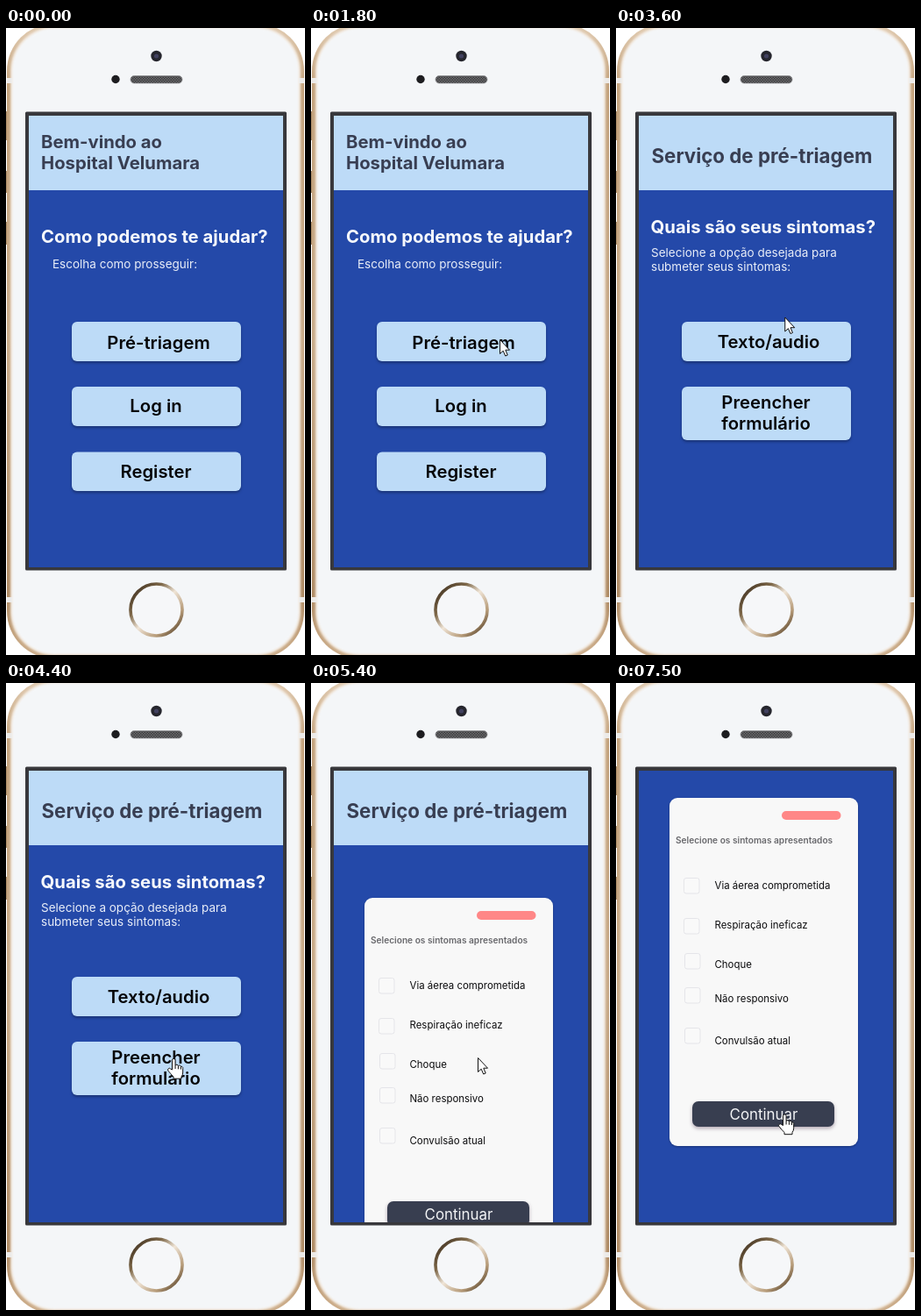
An HTML page for the animation above (8 s loop, 341 px wide and 715 px high).

```html
<!DOCTYPE html>
<html lang="pt">
<head>
<meta charset="utf-8">
<title>Pré-triagem</title>
<style>
html, body { margin: 0; height: 100%; overflow: hidden; background: #fff; }
svg { display: block; width: 100vw; height: 100vh; }
text { font-family: Inter, sans-serif; font-optical-sizing: none; }
.title { font-weight: 700; fill: #383e52; }
.ask { font-weight: 700; font-size: 20.3px; fill: #f6f8fc; }
.note { font-size: 13.5px; fill: #e9eef8; }
.label { font-weight: 600; font-size: 20.3px; text-anchor: middle; fill: #050507; }
.item { font-size: 11.45px; fill: #0c0c0e; }
.btn { fill: #bddbf7; filter: drop-shadow(0 2px 1.5px rgba(0,0,0,.3)); }
.check { fill: #f9f9f9; stroke: #e5e5e9; }
.soft { filter: blur(1px); }
</style>
</head>
<body>
<svg viewBox="0 0 341 715">
  <defs>
    <linearGradient id="gold" x2="0" y2="1">
      <stop offset="0" stop-color="#e2cdb4"/>
      <stop offset=".1" stop-color="#c3a27c"/>
      <stop offset=".5" stop-color="#c8aa88"/>
      <stop offset=".9" stop-color="#ae8a63"/>
      <stop offset="1" stop-color="#cfb18f"/>
    </linearGradient>
    <linearGradient id="ring" x2="1" y2="1">
      <stop offset=".1" stop-color="#4a3a27"/>
      <stop offset=".3" stop-color="#7d6748"/>
      <stop offset=".5" stop-color="#efe4d6"/>
      <stop offset=".75" stop-color="#b79c7a"/>
      <stop offset=".9" stop-color="#6b553a"/>
    </linearGradient>
    <pattern id="mesh" width="3" height="3" patternUnits="userSpaceOnUse">
      <path fill="#6c6c6e" d="M0 0h3v3h-3z"/>
      <path fill="#3b3b3d" d="M0 0h1.5v1.5h-1.5zM1.5 1.5h1.5v1.5h-1.5z"/>
    </pattern>
    <clipPath id="view"><rect x="26" y="100" width="290" height="515"/></clipPath>
  </defs>

  <!-- phone -->
  <path fill="#a98a66" d="M0 95h2v33H0zM0 163h2v25H0zM0 221h2v26H0z"/>
  <rect x="1" y="-5" width="339" height="724" rx="54" fill="url(#gold)"/>
  <rect class="soft" x="5" y="-1.500" width="331" height="717" rx="50" fill="#f0e4d6"/>
  <path fill="#eceae7" d="M1 57h6v6H1zM334 57h6v6h-6zM1 649h6v6H1zM334 649h6v6h-6z"/>
  <rect class="soft" x="7" y="0" width="327" height="714" rx="49" fill="#f4f6f8"/>
  <circle cx="171.5" cy="32" r="6.2" fill="#25252d"/>
  <circle cx="171.5" cy="32" r="2.6" fill="#41415f"/>
  <circle cx="125" cy="58.5" r="4.7" fill="#1d1d20"/>
  <rect x="142" y="54.5" width="59" height="8.5" rx="4.2" fill="url(#mesh)" stroke="#8a8a8d" stroke-width=".7"/>
  <circle cx="171.5" cy="663.5" r="29.5" fill="#f6f7f9" stroke="url(#ring)" stroke-width="3.6"/>
  <rect x="22" y="95.500" width="298" height="523" rx="1.5" fill="#38383c"/>

  <g clip-path="url(#view)">
    <rect x="26" y="100" width="290" height="515" fill="#2449a9"/>

    <g id="home">
      <path fill="#bddbf7" d="M26 100h290v85H26z"/>
      <g class="title" font-size="20.3">
        <text x="40" y="136.5">Bem-vindo ao</text>
        <text x="40" y="160.5">Hospital Velumara</text>
      </g>
      <text class="ask" x="40" y="244.5">Como podemos te ajudar?</text>
      <text class="note" x="53" y="274">Escolha como prosseguir:</text>
      <rect class="btn" x="75" y="335" width="193" height="45" rx="6"/>
      <rect class="btn" x="75" y="409" width="193" height="45" rx="6"/>
      <rect class="btn" x="75" y="483.5" width="193" height="44.5" rx="6"/>
      <text class="label" x="174" y="366">Pré-triagem</text>
      <text class="label" x="171" y="438">Log in</text>
      <text class="label" x="171" y="512.5">Register</text>
    </g>

    <g id="triage">
      <path fill="#bddbf7" d="M26 100h290v85H26z"/>
      <text class="title" font-size="22.3" x="40.5" y="153.5">Serviço de pré-triagem</text>

      <g id="choice">
        <text class="ask" x="39.5" y="233.5">Quais são seus sintomas?</text>
        <text class="note" x="40" y="261">Selecione a opção desejada para</text>
        <text class="note" x="40" y="277">submeter seus sintomas:</text>
        <rect class="btn" x="75" y="335" width="193" height="45" rx="6"/>
        <rect class="btn" x="75" y="409" width="193" height="61" rx="6"/>
        <text class="label" x="174" y="364.5">Texto/audio</text>
        <text class="label" x="171" y="434">Preencher</text>
        <text class="label" x="171" y="458">formulário</text>
      </g>

      <g id="form">
        <rect x="61" y="245" width="215" height="397" rx="9" fill="#f8f8f8" style="filter:drop-shadow(0 1px 1px rgba(0,0,0,.3))"/>
        <rect x="189" y="260" width="67.5" height="10" rx="5" fill="#ff8787"/>
        <text x="68" y="297" font-size="10.15" font-weight="600" fill="#68686c">Selecione os sintomas apresentados</text>
        <g id="items"></g>
        <rect x="87" y="591" width="162" height="29" rx="7" fill="#383e50" style="filter:drop-shadow(0 2px 2px rgba(70,40,70,.4))"/>
        <text x="168.5" y="612" font-size="16.9" text-anchor="middle" fill="#f3f4f6">Continuar</text>
      </g>
    </g>
  </g>

  <g id="cursor" fill="#fff" stroke="#111" stroke-linejoin="round">
    <path id="arrow" d="M.5 .5V16.5L4.2 13.2 6.7 19 9.2 18 6.8 12.2H11.5Z"/>
    <g id="hand">
      <path d="M-1.5 13V2.2a1.8 1.8 0 0 1 3.6 0V8a1.8 1.8 0 0 1 3.3 .7a1.7 1.7 0 0 1 3.1 .9a1.5 1.5 0 0 1 2.2 1.6V16q0 3-1.7 5v2.2H0V21Q-3 18-6 14.2a1.7 1.7 0 0 1 2.7-2.2Z"/>
      <path fill="none" d="M2.1 8v4M5.4 8.7v3.6M8.5 9.6v3"/>
    </g>
  </g>
</svg>
<script>
const LOOP = 8000, STEP = 100, SCROLL = 114;
const $ = id => document.getElementById(id);
const show = (id, on) => $(id).style.display = on ? '' : 'none';

// [label, text baseline, checkbox x, checkbox y]
$('items').innerHTML = [
  ['Via áerea comprometida', 349, 77.5, 336.5],
  ['Respiração ineficaz', 394, 77.5, 382.5],
  ['Choque', 438.5, 78.5, 422.5],
  ['Não responsivo', 477.5, 78.5, 461.5],
  ['Convulsão atual', 525.5, 78.5, 507.5]
].map(([label, base, x, y]) =>
  `<rect class="check" x="${x}" y="${y}" width="17.5" height="17.5" rx="2.5"/>
   <text class="item" x="112.5" y="${base}">${label}</text>`).join('');

// Pointer path: [time, x, y]
const path = [
  [200, 119, 94], [700, 225, 300], [900, 218, 330], [1000, 218, 330],
  [1200, 218, 346], [1300, 218, 346], [1500, 216, 353], [1700, 216, 353],
  [1800, 215, 355], [2800, 215, 355], [2900, 211, 354], [3300, 196, 241],
  [3700, 191, 359], [4400, 191, 428], [4600, 191, 428], [4700, 190, 428],
  [5300, 190, 428], [5400, 190, 427], [6700, 190, 427], [7500, 192, 491.5],
  [LOOP, 192, 491.5]
];

function pointerAt(t) {
  const i = Math.max(1, path.findIndex(p => p[0] > t));
  const [t0, x0, y0] = path[i - 1], [t1, x1, y1] = path[i];
  const k = (t - t0) / (t1 - t0);
  return [x0 + (x1 - x0) * k, y0 + (y1 - y0) * k];
}

function draw(now) {
  const t = Math.floor(now % LOOP / STEP) * STEP;
  const home = t < 2000, choice = !home && t < 4700, scrolled = t >= 5800;
  show('home', home);
  show('triage', !home);
  show('choice', choice);
  show('form', !home && !choice);
  $('triage').setAttribute('transform', `translate(0 ${scrolled ? -SCROLL : 0})`);

  const [x, y] = pointerAt(t);
  const hand = choice && y >= 409 || scrolled && y >= 477;
  show('cursor', t >= 200);
  show('arrow', !hand);
  show('hand', hand);
  $('cursor').setAttribute('transform', `translate(${x} ${y})`);
  requestAnimationFrame(() => draw(performance.now() - start));
}
const start = performance.now();
draw(0);
</script>
</body>
</html>
```
